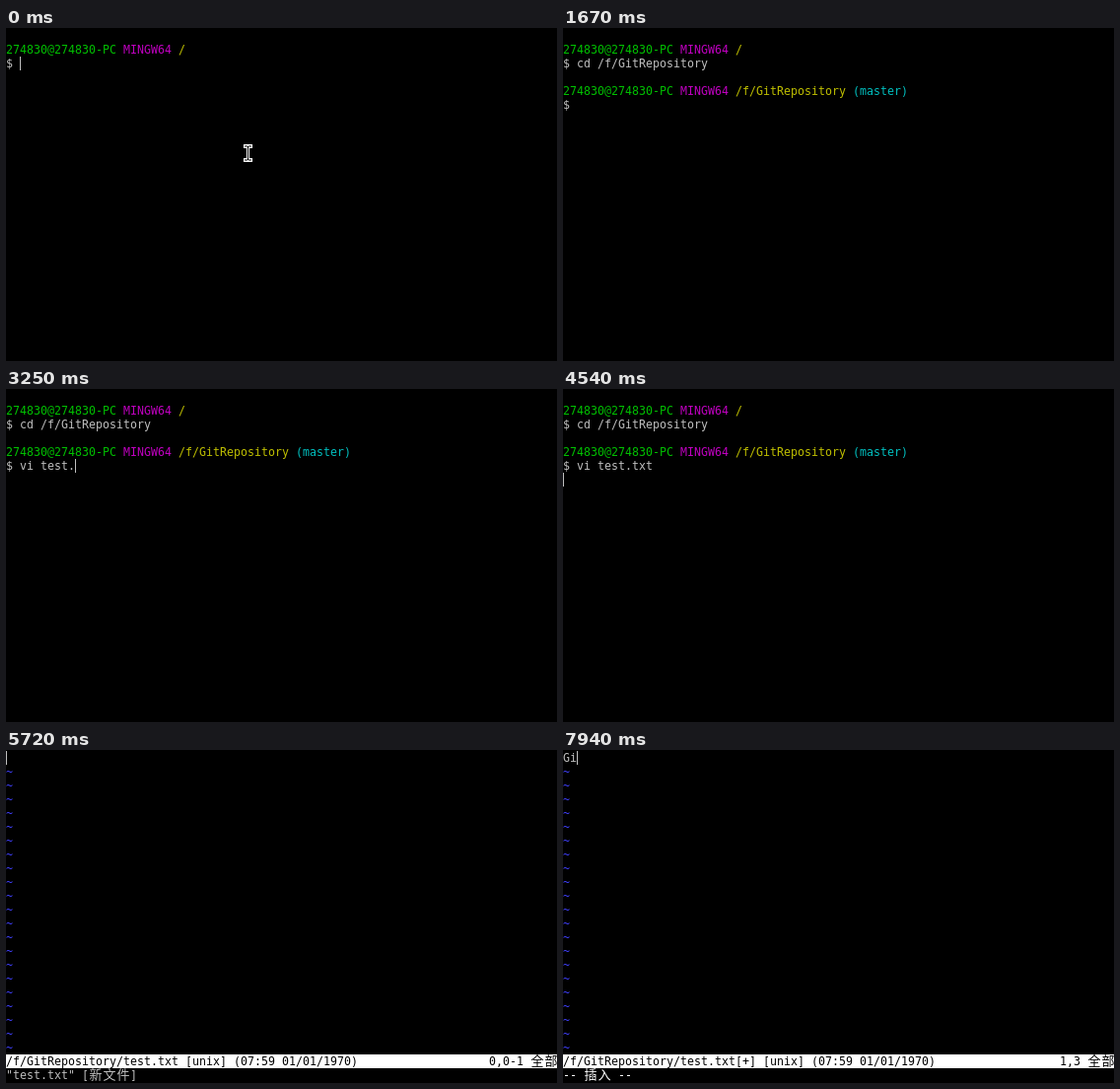
Recreate the animation shown at these times as an HTML page with a canvas. Size 559x338 px, loop 8 s.

```html
<!DOCTYPE html>
<html lang="zh">
<head>
<meta charset="utf-8">
<title>Terminal</title>
<style>
html, body { margin: 0; width: 100%; height: 100%; overflow: hidden; background: #000; }
canvas { display: block; }
</style>
</head>
<body>
<canvas id="stage" width="559" height="338"></canvas>
<script>
const ctx = document.getElementById('stage').getContext('2d');
const LOOP = 8000, CELL = 7, LINE = 14;
const GREY = '#bfbfbf', GREEN = '#00bf00', MAGENTA = '#bf00bf', YELLOW = '#bfbf00',
      CYAN = '#00bfbf', BLUE = '#4040ff', WHITE = '#fff', BLACK = '#000';
const LATIN = '11.6px "DejaVu Sans Mono", monospace';
const HAN = '13px "Noto Sans CJK SC", "Noto Sans CJK", sans-serif';

const USER = '274830@274830-PC';
const COMMAND = 'vi test.txt';
const KEY_TIMES = [2220, 2340, 2530, 2770, 2890, 2950, 3070, 3250, 3560, 3930, 4300];
const HIDDEN = [[250, 430], [1670, 2160], [5220, 5720], [6650, 7140], [7640, 7700]];

const rowTop = row => 1 + row * LINE;

function rect(color, x, y, w, h) {
  ctx.fillStyle = color;
  ctx.fillRect(x, y, w, h);
}

// Writes on the character grid; Han characters take two cells. Returns the next column.
function write(text, col, row, color = GREY) {
  ctx.fillStyle = color;
  for (const ch of text) {
    const wide = ch > '\u2fff';
    ctx.font = wide ? HAN : LATIN;
    ctx.fillText(ch, col * CELL + (wide ? 0.5 : 0), rowTop(row) + 11);
    col += wide ? 2 : 1;
  }
  return col;
}

function prompt(row, path, branch = '') {
  write(USER, 0, row, GREEN);
  write('MINGW64', 17, row, MAGENTA);
  const col = write(path, 25, row, YELLOW);
  write(branch, col + 1, row, CYAN);
  write('$', 0, row + 1);
}

function cursor(t, col, row) {
  if (!HIDDEN.some(([from, to]) => t >= from && t < to)) {
    rect(GREY, col * CELL, rowTop(row), 1, LINE);
  }
}

function pointer() {
  rect(WHITE, 241, 118, 9, 4);
  rect(WHITE, 241, 132, 9, 4);
  rect(WHITE, 244, 120, 3, 14);
  for (const y of [119, 133]) {
    rect(BLACK, 242, y + 0.5, 3, 1);
    rect(BLACK, 246, y + 0.5, 3, 1);
  }
  rect(BLACK, 245, 120, 1, 14);
}

function shell(t) {
  prompt(1, '/');
  let col = 2, row = 2;
  if (t >= 430) col = write('cd /f/GitRepository', 2, 2);
  if (t < 990) pointer();
  else [col, row] = [0, 3];
  if (t >= 1110) {
    prompt(4, '/f/GitRepository', '(master)');
    const typed = KEY_TIMES.filter(k => k <= t).length;
    col = write(COMMAND.slice(0, typed), 2, 5);
    row = 5;
  }
  if (t >= 4540) [col, row] = [0, 6];
  cursor(t, col, row);
}

function editor(t) {
  const insert = t >= 6090, changed = t >= 7700;
  const text = t >= 7940 ? 'Gi' : changed ? 'G' : '';
  const place = changed ? '1,' + (text.length + 1) : insert ? '0,1' : '0,0-1';
  write(text, 0, 0);
  for (let row = 1; row < 22; row++) write('~', 0, row, BLUE);
  rect(WHITE, 0, rowTop(22), 559, LINE);
  write(`/f/GitRepository/test.txt${changed ? '[+]' : ''} [unix] (07:59 01/01/1970)`, 0, 22, BLACK);
  write(place, 75 - place.length, 22, BLACK);
  write('全部', 76, 22, BLACK);
  if (insert) write('-- 插入 --', 0, 23, WHITE);
  else write('"test.txt" [新文件]', 0, 23);
  cursor(t, text.length, 0);
}

function draw(now) {
  const t = now % LOOP;
  rect(BLACK, 0, 0, 559, 338);
  (t < 4660 ? shell : editor)(t);
}

function tick() {
  draw(performance.now());
  requestAnimationFrame(tick);
}
tick();
</script>
</body>
</html>
```
